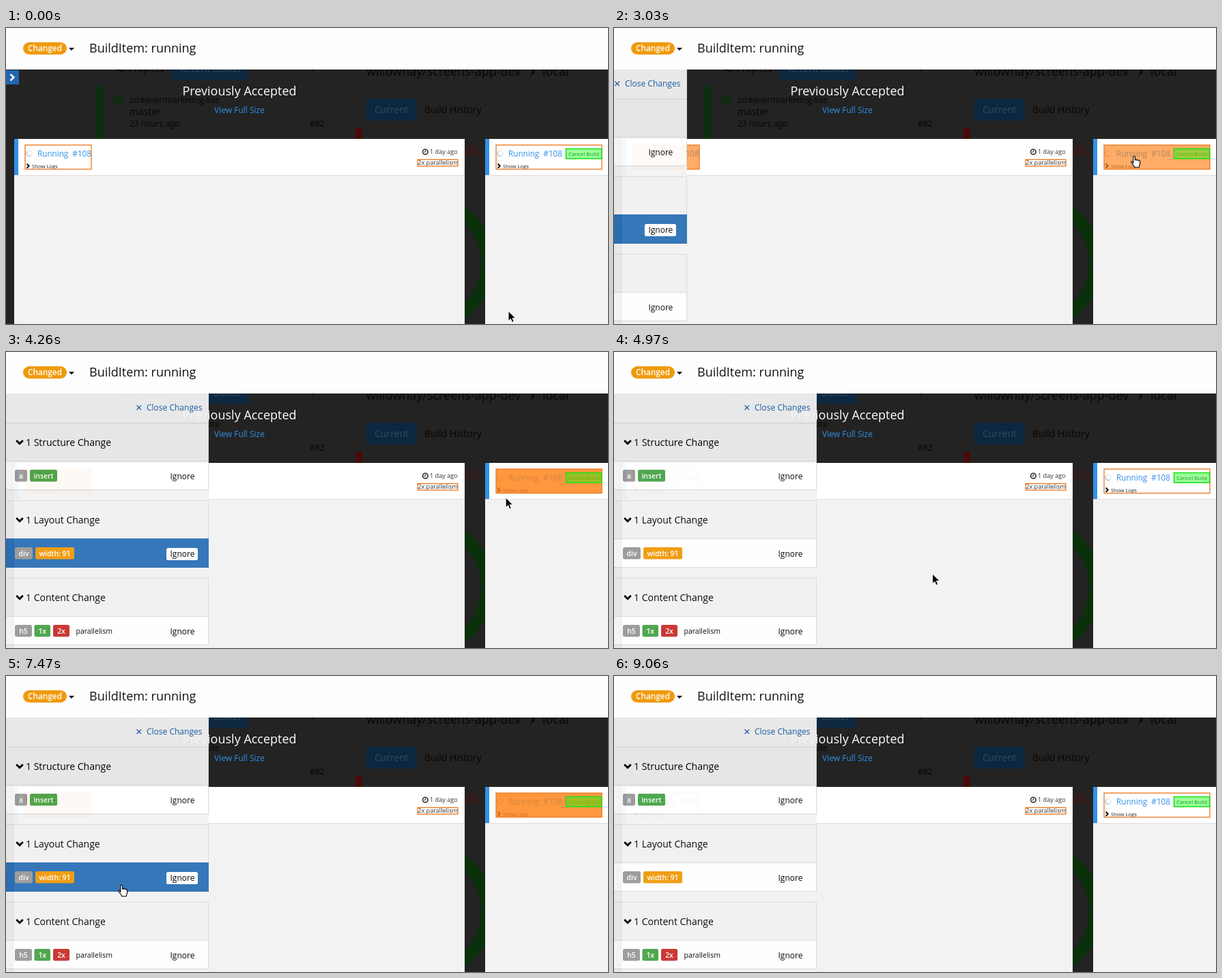
Write an HTML page that moves like this. It is 882 px wide and 435 px high and loops after 9.57 s.

```html
<!DOCTYPE html>
<html lang="en">
<head>
<meta charset="utf-8">
<title>BuildItem: running</title>
<style>
  html, body { margin: 0; width: 100%; height: 100%; overflow: hidden; background: #232323; }
  svg { display: block; width: 882px; height: 435px; font-family: "Open Sans", "Noto Sans", sans-serif; }
  text { white-space: pre; }
</style>
</head>
<body>
<svg id="stage" viewBox="0 0 882 435" xmlns="http://www.w3.org/2000/svg"></svg>
<script>
const LOOP = 9570;
const BLUE = '#3190e8', ORANGE = '#ee7f2d', GREEN = '#47a447';

// ---- drawing helpers ----
const rect = (x, y, w, h, fill, more = '') =>
  `<rect x="${x}" y="${y}" width="${w}" height="${h}" fill="${fill}" ${more}/>`;
const text = (x, y, size, fill, str, more = '') =>
  `<text x="${x}" y="${y}" font-size="${size}" fill="${fill}" ${more}>${str}</text>`;
const line = (d, color, width) =>
  `<path d="${d}" fill="none" stroke="${color}" stroke-width="${width}"/>`;
const frame = (x, y, w, h, color, width = 1.4) =>
  rect(x, y, w, h, 'none', `stroke="${color}" stroke-width="${width}"`);
const tint = (name, x, y, w, h) =>
  rect(x, y, w, h, '#ff7d10', `class="${name}" opacity="0"`);

// ---- dimmed page behind the overlay ----
function page() {
  const ink = '#060606', dimGreen = '#0a300c';
  return rect(0, 0, 882, 435, '#232323')
    + text(160, 65, 14, ink, 'All Projects')
    + rect(243, 50, 112, 26, '#0c2740', 'rx="3"')
    + text(255, 65, 14, '#34495c', 'Recent Builds')
    + rect(448, 61, 3, 2, ink)
    + rect(132, 86, 10, 90, dimGreen)
    + `<circle cx="164" cy="106" r="7" fill="${dimGreen}"/>`
    + line('M160.5 106l2.6 2.7 4.6-4.8', '#232323', 2)
    + text(181, 110, 11.85, ink, 'screener/marketing-site')
    + text(181, 128, 14, ink, 'master')
    + text(181, 145, 12, ink, '23 hours ago')
    + text(445, 145, 12, ink, '#82')
    + text(528, 70, 18, ink, 'willowhay/screens-app-dev')
    + line('M769 60l4.5 4.5-4.5 4.5', ink, 2)
    + text(786, 70, 18, ink, 'local')
    + rect(528, 104, 74, 32, '#0c2740')
    + text(540, 125, 14, '#34495c', 'Current')
    + text(613, 125, 14, ink, 'Build History')
    + rect(512, 147, 10, 30, '#4a0a0a')
    + text(693, 186, 18, '#4d0c0c', 'nzE', 'text-anchor="end"')
    + `<circle cx="614" cy="345" r="91.5" fill="none" stroke="${dimGreen}" stroke-width="19"/>`
    + text(342, 99, 18, '#fff', 'Previously Accepted', 'text-anchor="middle"')
    + text(342, 125, 12, BLUE, 'View Full Size', 'text-anchor="middle"');
}

// ---- one screenshot card; x is its left edge ----
function shot(x, width, boxWidth, extra) {
  return rect(x, 163, width, 272, '#f2f2f2')
    + rect(x, 163, width, 53, '#fff')
    + rect(x, 216, width, 1, '#dedede')
    + rect(x, 163, 6, 53, BLUE)
    + `<circle cx="${x + 22}" cy="184.5" r="4" fill="none" stroke="#e6eaee" stroke-width="1.6"/>`
    + line(`M${x + 24} 188a4 4 0 0 1-5-6`, '#b4cde4', 1.6)
    + text(x + 34, 189, 11.7, BLUE, 'Running  #108')
    + line(`M${x + 18.5} 199.5l3.2 3.2-3.2 3.2`, '#111', 2)
    + text(x + 26, 206, 7.7, '#222', 'Show Logs')
    + extra
    + tint('divTint', x + 16, 172, boxWidth, 36)
    + frame(x + 16, 172, boxWidth, 35.5, ORANGE);
}

function shots() {
  const meta = `<circle cx="614.3" cy="182" r="3.8" fill="none" stroke="#222" stroke-width="1.5"/>`
    + line('M614.5 179.8v2.5h-2', '#222', 1)
    + text(621, 185.3, 9.1, '#333', '1 day ago')
    + text(603.3, 201.3, 9.1, '#333', '2x parallelism')
    + tint('textTint', 603, 193, 59, 10)
    + frame(603, 193.4, 59, 9.6, ORANGE);
  const label = text(824, 187.7, 7.85, '#3b4a3b', 'Cancel Build');
  const mark = rect(820.5, 177.5, 52, 14.5, '#00ff00', 'id="linkTint"')
    + frame(820.5, 177.5, 52, 14.5, '#1fe01f', 1.6);
  return shot(12, 660, 97, meta) + shot(702, 180, 155, label) + mark;
}

// ---- side panel ----
const badge = (x, y, w, fill, str) =>
  rect(x, y, w, 17.5, fill, 'rx="2.5"')
  + text(x + w / 2, y + 12.7, 10.4, '#fff', str, 'text-anchor="middle" font-weight="600"');

function section(i, title, badges, tail = '') {
  const y = 104 + i * 114;
  return rect(0, y, 297, 57, '#f1f1f1')
    + rect(0, y + 57, 297, 42, '#fff')
    + [y, y + 56, y + 98].map(v => rect(0, v, 297, 1, '#d9d9d9')).join('')
    + rect(296, y, 1, 99, '#d9d9d9')
    + line(`M15.2 ${y + 26}l4.8 4.8 4.8-4.8`, '#000', 2.9)
    + text(29, y + 34, 14, '#000', title)
    + `<g id="row${i}" opacity="0">${rect(0, y + 56, 297, 43, '#2c71b6')}`
    + `${rect(235, y + 70, 46, 18, '#fff', 'rx="2.5"')}</g>`
    + badges.map(([x, w, fill, str]) => badge(x, y + 69, w, fill, str)).join('')
    + tail
    + text(240.5, y + 83, 12, '#000', 'Ignore');
}

function panel() {
  const grey = '#999';
  return `<g id="panel" opacity=".95">`
    + rect(0, 61, 297, 374, '#f3f3f3')
    + line('M191.5 78.5l6.5 6.5m0-6.5l-6.5 6.5', '#1c63ab', 1.2)
    + text(206, 86, 12, '#1c63ab', 'Close Changes')
    + section(0, '1 Structure Change', [[13, 18, grey, 'a'], [35, 40, GREEN, 'insert']])
    + section(1, '1 Layout Change', [[13, 26, grey, 'div'], [43, 57, '#f09a0a', 'width: 91']])
    + section(2, '1 Content Change',
        [[13, 25, grey, 'h5'], [41.5, 23.5, GREEN, '1x'], [69, 24, '#c9302c', '2x']],
        text(102.5, 414, 10.5, '#000', 'parallelism'))
    + '</g>';
}

function header() {
  return rect(0, 0, 882, 61, '#fefefe')
    + rect(25, 21, 64, 18, '#f09a0a', 'rx="9"')
    + text(57, 34.3, 11.8, '#fff', 'Changed', 'text-anchor="middle" font-weight="600"')
    + '<path d="M92 29h8l-4 4.2z" fill="#111"/>'
    + text(122, 36, 18, '#111', 'BuildItem: running');
}

function pointers() {
  return '<path id="arrow" d="M.5 0v14.6l3.4-3.2 2.2 5.2 2.6-1.1-2.2-5h4.6z"'
    + ' fill="#000" stroke="#fff" stroke-width="1"/>'
    + '<path id="hand" d="M4.3 11.2V2.2C4.3.3 7 .3 7 2.2v4.6c.2-1.3 2.4-1.2 2.5.2'
    + ' .3-1.1 2.3-.9 2.4.5 .4-.9 2.2-.6 2.2 1v3.2c0 2-1.2 3-1.3 5.6H6.2'
    + 'c-.2-2.2-2.9-4.2-4.6-7C.6 8.7 2.4 8 3.2 9z" transform="translate(-.5 .5)"'
    + ' fill="#fff" stroke="#000" stroke-width="1.1" stroke-linejoin="round"/>';
}

const svg = document.getElementById('stage');
svg.innerHTML = page() + shots()
  + `<g id="toggle">${rect(0, 62, 19, 21, '#2066ad')}${line('M6.5 68l4.8 4.6-4.8 4.6', '#fff', 2.6)}</g>`
  + panel() + header() + `<g id="cursor">${pointers()}</g>`;

const byId = id => document.getElementById(id);
const setAll = (cls, v) => svg.querySelectorAll('.' + cls).forEach(e => e.setAttribute('opacity', v));
const setOpacity = (id, v) => byId(id).setAttribute('opacity', v);

// ---- motion ----
const clamp = v => Math.max(0, Math.min(1, v));
const smooth = v => v * v * (3 - 2 * v);
const ramp = (p, a, b) => clamp((p - a) / (b - a));

const phase = (t, t0, t1, n) =>
  t < t0 ? 0 : Math.min(1, (Math.floor((t - t0) / (t1 - t0) * (n - 1) + 1e-6) + 1) / n);

// start, end, steps, target x, target y, downward bow, linear
const MOVES = [
  [900, 1780, 11, 757, 187, 0],
  [4090, 4970, 11, 466, 326, 55],
  [5240, 5950, 9, 189, 183, 0],
  [6490, 7020, 7, 163.5, 306, 0],
  [7470, 7560, 2, 164.5, 306, 0],
  [7740, 8180, 6, 178, 402, 0],
  [8720, 9060, 5, 950, 440, 0, true]
];

function pointerAt(t) {
  let x = 735.5, y = 416;
  for (const [t0, t1, n, tx, ty, bow, linear] of MOVES) {
    const p = phase(t, t0, t1, n);
    if (!p) break;
    const e = linear ? p : smooth(p);
    x += (tx - x) * e;
    y += (ty - y) * e + bow * Math.sin(Math.PI * e);
  }
  return [x, y];
}

function draw(ms) {
  const t = ms % LOOP;
  const enter = phase(t, 900, 1780, 11), open = phase(t, 3030, 3380, 5);
  const leave = phase(t, 4090, 4970, 11), toLink = phase(t, 5240, 5950, 9);
  const toDiv = phase(t, 6490, 7020, 7), toText = phase(t, 7740, 8180, 6);
  const exit = phase(t, 8720, 9060, 5);

  const [x, y] = pointerAt(t);
  const overBox = x > 712 && y < 204;
  const overPanel = open === 1 && x < 292;
  const hand = overBox || overPanel;
  byId('cursor').setAttribute('transform', `translate(${x.toFixed(2)} ${y.toFixed(2)})`);
  setOpacity('hand', hand ? 1 : 0);
  setOpacity('arrow', hand ? 0 : 1);

  const slide = -297 * (1 - open) ** 2;
  byId('panel').setAttribute('transform', `translate(${slide.toFixed(2)} 0)`);
  byId('panel').setAttribute('visibility', open ? 'visible' : 'hidden');
  byId('toggle').setAttribute('visibility', open ? 'hidden' : 'visible');

  const link = ramp(toLink, .6, .9) * (1 - ramp(toDiv, .1, .4));
  const div = ramp(toDiv, .55, .9) * (1 - ramp(toText, .1, .5));
  const words = ramp(toText, .5, .9) * (1 - ramp(exit, .1, .7));
  const hover = ramp(enter, .7, 1) * (1 - open)
    + ramp(leave, 0, .18) * (1 - ramp(leave, .25, .5));

  setOpacity('row0', link);
  setOpacity('row1', Math.max(1 - ramp(leave, .2, .5), div));
  setOpacity('row2', words);
  setAll('divTint', .8 * Math.max(hover, div));
  setAll('textTint', .8 * words);
  setOpacity('linkTint', .4 + .5 * link);
}

const start = performance.now();
function tick() {
  draw(performance.now() - start);
  requestAnimationFrame(tick);
}
tick();
</script>
</body>
</html>
```
